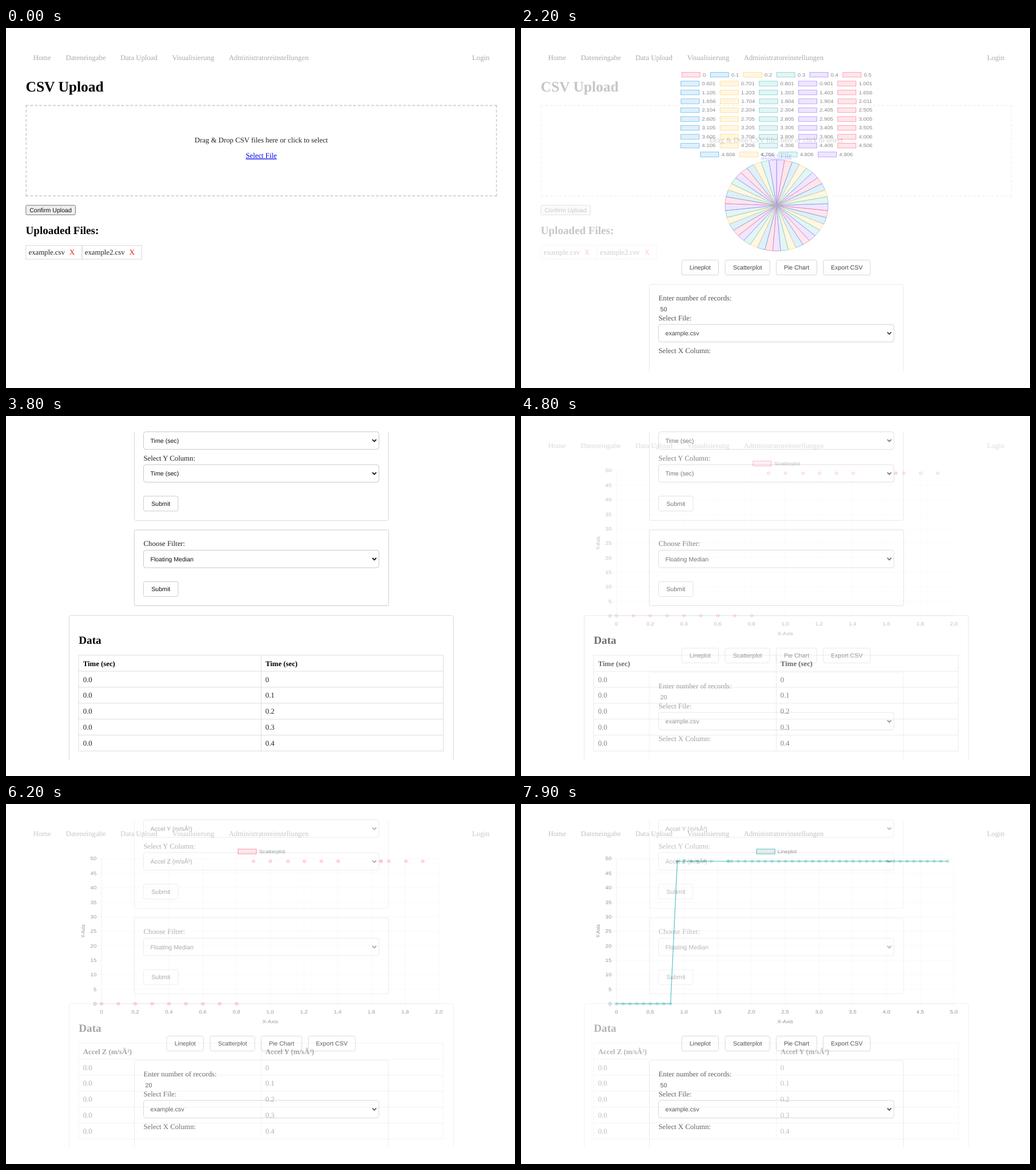
Animation of 890x629 px, one loop 8000 ms. Source, as an HTML page:

```html
<!DOCTYPE html>
<html lang="de">
<head>
<meta charset="utf-8">
<title>CSV Upload</title>
<style>
html, body { margin: 0; width: 100%; height: 100%; overflow: hidden; background: #fff; }
svg { display: block; width: 890px; height: 629px; }
text { font-family: "Liberation Serif", "Times New Roman", serif; font-size: 12.75px; fill: #222; white-space: pre; text-rendering: geometricPrecision; }
.ui { font-family: "Liberation Sans", Arial, sans-serif; font-size: 10.62px; fill: #111; }
.chart text { font-family: "Liberation Sans", Arial, sans-serif; font-size: 12px; fill: #666; }
.h1 { font-size: 25.5px; font-weight: bold; fill: #000; }
.h2 { font-size: 19.1px; font-weight: bold; fill: #000; }
.b { font-weight: bold; fill: #000; }
.nav { fill: #aaa; }
.link { fill: #00e; text-decoration: underline; }
.x { fill: #e8101c; }
.mid { text-anchor: middle; }
.end { text-anchor: end; }
</style>
</head>
<body>
<svg viewBox="0 0 890 629">
  <clipPath id="view"><rect y="27" width="890" height="573"/></clipPath>
  <g id="pages" clip-path="url(#view)"></g>
</svg>
<script>
const text = (x, y, s, cls = '') =>
  `<text x="${x}" y="${y}" class="${cls}">${s.replace('&', '&amp;')}</text>`;
const box = (x0, y0, x1, y1, stroke, r = 0, fill = 'none', extra = '') =>
  `<rect x="${x0}" y="${y0}" width="${x1 - x0}" height="${y1 - y0}" rx="${r}" fill="${fill}" stroke="${stroke}" ${extra}/>`;
const path = (d, stroke, fill = 'none', extra = '') =>
  `<path d="${d}" stroke="${stroke}" fill="${fill}" ${extra}/>`;
const range = (n, f) => Array.from({ length: n }, (_, i) => f(i));

const button = (x0, x1, y, s) =>
  box(x0, y, x1, y + 26, '#ccc', 3, '#fff') + text((x0 + x1) / 2, y + 16.8, s, 'ui mid');
const select = (y, s) =>
  box(240.5, y, 652, y + 30.7, '#c8c8c8', 4, '#fff') + text(252.5, y + 19.2, s, 'ui') +
  path(`M640.6 ${y + 13.6}l3.4 3.4 3.4-3.4`, '#111', 'none', 'stroke-width="1.8"');

// A dashed side begins and ends with a full dash, as a CSS border does.
function dashed(d, length) {
  const dash = 4.78, n = Math.round((length + 3.19) / (dash + 3.19));
  const gap = (length - n * dash) / (n - 1);
  return path(d, '#ccc', 'none', `stroke-width="1.6" stroke-dasharray="${dash} ${gap}"`);
}
const dashedBox = (x0, y0, x1, y1) =>
  [y0 + .8, y1 - .8].map(y => dashed(`M${x0} ${y}H${x1}`, x1 - x0)).join('') +
  [x0 + .8, x1 - .8].map(x => dashed(`M${x} ${y0}V${y1}`, y1 - y0)).join('');

const nav = [[47.5, 'Home'], [104.5, 'Dateneingabe'], [200, 'Data Upload'], [290.5, 'Visualisierung'],
  [389.5, 'Administratoreinstellungen'], [815, 'Login']].map(([x, s]) => text(x, 56, s, 'nav')).join('');

const upload = () => nav + text(34.5, 110.6, 'CSV Upload', 'h1') +
  dashedBox(34.5, 134.6, 858.4, 294.2) +
  text(446.3, 199.6, 'Drag & Drop CSV files here or click to select', 'mid') +
  text(446.3, 227.1, 'Select File', 'mid link') +
  box(34.9, 309.8, 121.4, 326.4, '#767676', 2, '#efefef') + text(78, 321.8, 'Confirm Upload', 'ui mid') +
  text(34.5, 359.5, 'Uploaded Files:', 'h2') +
  box(34.7, 380, 133, 404, '#d8d8d8') + box(133, 380, 237.2, 404, '#d8d8d8') +
  text(39.5, 396.4, 'example.csv') + text(111, 396.4, 'X', 'x') +
  text(137.8, 396.4, 'example2.csv') + text(215.8, 396.4, 'X', 'x');

// Charts are drawn in their own units on a squeezed canvas.
const SX = .797, SY = .704, CX = 447;
const H = x => (x - CX) / SX, V = y => y / SY;
const times = ('0 0.1 0.2 0.3 0.4 0.5 0.601 0.701 0.801 0.901 1.001 1.105 1.203 1.303 1.403 1.656 ' +
  '1.656 1.704 1.804 1.904 2.011 2.104 2.204 2.304 2.405 2.505 2.605 2.705 2.805 2.905 3.005 ' +
  '3.105 3.205 3.305 3.405 3.505 3.605 3.706 3.806 3.906 4.006 4.106 4.206 4.306 4.406 4.506 ' +
  '4.606 4.706 4.806 4.906').split(' ');
const ZEROS = 9;
const hues = ['255,99,132', '54,162,235', '255,206,86', '75,192,192', '153,102,255'];
const rgb = i => `rgb(${hues[i % 5]})`, tint = i => `rgba(${hues[i % 5]},.2)`;
const pen = document.createElement('canvas').getContext('2d');
pen.font = '12px "Liberation Sans", Arial, sans-serif';

function legend(y, items) {
  const widths = items.map(it => 56 + pen.measureText(it.label).width);
  let x = -(widths.reduce((a, b) => a + b) - 10) / 2;
  return items.map((it, i) => {
    const s = box(x, y - 6, x + 40, y + 6, it.stroke, 0, it.fill, `stroke-width="${it.w || 1}"`) +
      text(x + 46, y + 4.2, it.label);
    x += widths[i];
    return s;
  }).join('');
}

function pie() {
  const items = times.map((label, i) => ({ label, stroke: rgb(i), fill: tint(i) }));
  const rows = range(10, r => legend(V(81.6) + 22 * r, r ? items.slice(1 + 5 * r, 6 + 5 * r) : items.slice(0, 6)));
  const n = times.length - ZEROS, R = 113, cy = V(310);
  const rim = k => {
    const a = 2 * Math.PI * k / n;
    return `${R * Math.sin(a)} ${cy - R * Math.cos(a)}`;
  };
  return rows.join('') + range(n, k =>
    path(`M0 ${cy}L${rim(k)}A${R} ${R} 0 0 1 ${rim(k + 1)}Z`, rgb(k + ZEROS), tint(k + ZEROS))).join('');
}

function plot(label, count, max, step, stroke, fill, line) {
  const X = v => H(167 + 590 * v / max), Y = v => V(349 - 5.07 * v);
  const left = X(0), right = X(max), low = Y(0), high = Y(50);
  const ticks = Math.round(max / step);
  const grid = 'rgba(0,0,0,.05)', axis = 'rgba(0,0,0,.12)';
  const points = times.slice(0, count).map((t, i) => [X(+t), Y(i < ZEROS ? 0 : 49.1)]);
  const midY = V(222);
  return legend(V(83), [{ label, stroke, fill, w: line ? 2 : 1.5 }]) +
    range(11, i => path(`M${left - 8} ${Y(5 * i)}H${right}`, i ? grid : axis) +
      text(left - 11, Y(5 * i) + 4.2, String(5 * i), 'end')).join('') +
    range(ticks + 1, i => path(`M${X(i * step)} ${high}V${low + 8}`, i ? grid : axis) +
      text(X(i * step), V(366), i ? (i * step).toFixed(1).replace('.', ',') : '0', 'mid')).join('') +
    text(H(462), V(383), 'X-Axis', 'mid') +
    `<g transform="rotate(-90 ${H(138.5)} ${midY})">${text(H(138.5), midY, 'Y-Axis', 'mid')}</g>` +
    (line ? path('M' + points.join('L'), stroke, 'none', 'stroke-width="2"') : '') +
    points.map(([x, y]) => `<circle cx="${x}" cy="${y}" r="3.2" fill="${fill}" stroke="${stroke}"/>`).join('');
}

const visual = (chart, records) => nav +
  `<g class="chart" transform="translate(${CX} 0) scale(${SX} ${SY})">${chart}</g>` +
  button(281, 345.5, 405.5, 'Lineplot') + button(357, 435, 405.5, 'Scatterplot') +
  button(446.3, 517.3, 405.5, 'Pie Chart') + button(528.6, 610.8, 405.5, 'Export CSV') +
  box(224.5, 448, 668.5, 640, '#e2e2e2', 3) +
  text(240.5, 475.7, 'Enter number of records:') + text(243.6, 494.8, records, 'ui') +
  text(240.5, 510.6, 'Select File:') + select(517.9, 'example.csv') + text(240.5, 568.3, 'Select X Column:');

const form = (colX, colY, headX, headY) =>
  box(224.5, 0, 668.5, 182.5, '#d8d8d8', 3) + select(27.6, colX) +
  text(240.5, 77.5, 'Select Y Column:') + select(85, colY) + button(240.5, 301, 140, 'Submit') +
  box(224.3, 199, 669, 331.5, '#ccc', 3) + text(240.5, 227, 'Choose Filter:') +
  select(234.4, 'Floating Median') + button(240.5, 301, 289.4, 'Submit') +
  box(110.5, 348.7, 782.3, 640, '#d8d8d8', 3) + text(127.3, 397.6, 'Data', 'h2') +
  box(127, 418, 764.7, 585.3, '#ddd') + path('M446.3 418V585.3', '#ddd') +
  text(134.8, 436.7, headX, 'b') + text(453.8, 436.7, headY, 'b') +
  range(5, i => path(`M127 ${446 + 27.9 * i}H764.7`, '#ddd') +
    text(134.8, 464.6 + 27.8 * i, '0.0') + text(453.5, 464.6 + 27.8 * i, i ? '0.' + i : '0')).join('');

const time = 'Time (sec)', accelY = 'Accel Y (m/sÂ²)', accelZ = 'Accel Z (m/sÂ²)';
// Each page fades in over the one before: start and length in ms.
const pages = [
  [upload(), 0, 0],
  [visual(pie(), '50'), 1735, 600],
  [form(time, time, time, time), 3185, 610],
  [visual(plot('Scatterplot', 20, 2, .2, rgb(0), tint(0)), '20'), 4510, 680],
  [form(accelY, accelZ, accelZ, accelY), 5990, 600],
  [visual(plot('Lineplot', 50, 5, .5, rgb(3), 'rgba(0,0,0,.1)', true), '50'), 7470, 610]
];
const stage = document.getElementById('pages');
stage.innerHTML = pages.map(([s]) => `<g><rect width="890" height="629" fill="#fff"/>${s}</g>`).join('');

function draw(now) {
  const t = Math.floor(now % 8000 / 100) * 100;
  pages.forEach(([, start, length], i) => {
    const p = length ? Math.min(1, Math.max(0, (t - start) / length)) : 1;
    const g = stage.children[i];
    g.style.opacity = p;
    g.style.display = p ? '' : 'none';
  });
  requestAnimationFrame(draw);
}
draw(0);
</script>
</body>
</html>
```
